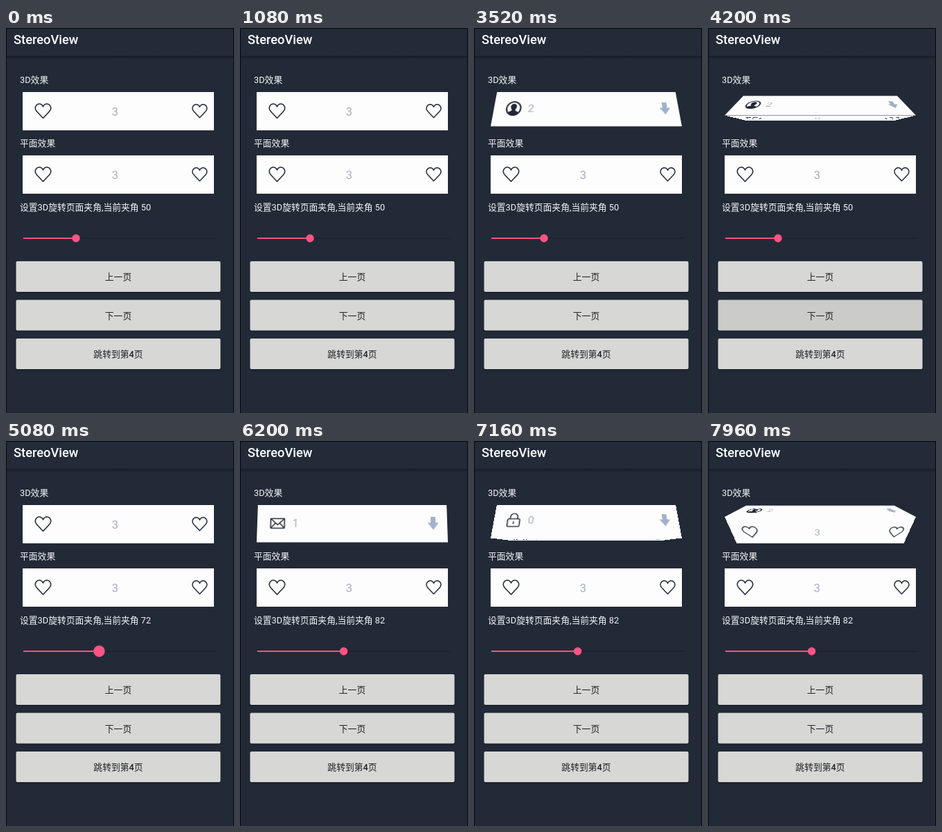
These frames come from a looping animation (329x553 px, 8 s). An HTML page:

```html
<!DOCTYPE html>
<html lang="zh">
<head>
<meta charset="utf-8">
<title>StereoView</title>
<style>
  html, body { margin: 0; width: 100%; height: 100%; overflow: hidden; background: #222a37; }
  #stage { position: absolute; left: 0; top: 0; width: 329px; height: 553px; overflow: hidden; }
  svg { position: absolute; left: 0; top: 0; display: block; }
  text { font-family: Roboto, "Noto Sans CJK SC", "Noto Sans CJK", sans-serif; }
  .title { font-size: 18.3px; font-weight: 500; fill: #fff; }
  .label { font-size: 12.8px; fill: #f4f5f7; }
  .button rect { fill: #d7d7d6; filter: drop-shadow(0 1px 1px rgba(0, 0, 0, .4)); }
  .button .press { fill: #000; opacity: 0; filter: none; }
  .button text { font-size: 12.8px; font-weight: 500; fill: #1f2126; text-anchor: middle; }
  .view { position: absolute; left: 24px; width: 276px; height: 55px; overflow: hidden; }
  .page { background: #fdfdfd; }
  .page text { font-size: 16.5px; fill: #a6aec1; text-anchor: middle; }
  .line { fill: none; stroke: #252c3b; stroke-width: 1.6; stroke-linejoin: round; stroke-linecap: round; }
  .solid { fill: #1f2839; }
  .arrow { fill: #a2b0cb; }
</style>
</head>
<body>
<div id="stage">
  <svg width="329" height="553">
    <defs>
      <linearGradient id="shade" x2="0" y2="1">
        <stop stop-color="#161c27"/>
        <stop offset="1" stop-color="#161c27" stop-opacity="0"/>
      </linearGradient>
    </defs>
    <rect width="329" height="41" fill="#232a38"/>
    <rect y="40" width="329" height="5" fill="url(#shade)"/>
    <text class="title" x="11" y="22.5">StereoView</text>
    <text class="label" x="20" y="78.7">3D效果</text>
    <text class="label" x="20" y="170">平面效果</text>
    <text class="label" x="20" y="261.5" id="angle"></text>
    <path d="M25 302H303" stroke="#1b222d" stroke-width="1.5"/>
    <path id="track" stroke="#fb5080" stroke-width="2"/>
    <circle id="thumb" cy="302" fill="#ff5482"/>
    <g id="buttons"></g>
    <path d="M.5 553V.5H328.5V553" fill="none" stroke="#05070a"/>
  </svg>
  <div class="view" id="stereo" style="top:92px"></div>
  <div class="view" id="flat" style="top:183px"></div>
</div>
<script>
const LOOP = 8000, STEP = 40, HEIGHT = 55, DEPTH = 175;
const $ = id => document.getElementById(id);
const clamp = x => Math.max(0, Math.min(1, x));
const mix = (a, b, k) => a + (b - a) * k;

// Icons are drawn around their own centre
const at = (x, y, body, scale = 1) =>
  `<g transform="translate(${x} ${y}) scale(${scale})">${body}</g>`;
const heart = '<path class="line" d="M0 10.5L-9 1C-14-4.5-9.500-10-5.500-10C-2.500-10-.8-8 0-6C.8-8 2.500-10 5.500-10C9.500-10 14-4.500 9 1Z"/>';
const lock = '<rect class="line" x="-9" y="-2" width="18" height="12" rx="1.500"/><path class="line" d="M-5.500-2V-5A5.500 5.500 0 0 1 5.500-5V-2M0 2.500V5.500"/>';
const mail = '<rect class="line" x="-10" y="-7" width="20" height="14" rx="1"/><path class="line" d="M-9.500-6.500L0 2L9.500-6.500M-9.500 6.500L-3-.5M9.500 6.500L3-.5"/>';
const person = '<circle class="line" r="10.500" style="stroke-width:2.200"/><path class="solid" d="M-8 7C-6.500 4-2.500 4.500-2.500 2C-6-2-4.500-7.500 0-7.500S6 -2 2.500 2C2.500 4.500 6.500 4 8 7C4 11.500-4 11.500-8 7Z"/>';
const arrow = '<path class="arrow" d="M-3.500-9.500H3.500V-1H8L0 9.500L-8-1H-3.500Z"/>';

const page = body => `<svg class="page" width="276" height="${HEIGHT}">${body}</svg>`;
const entry = (icon, n) =>
  page(at(29.5, 27.5, icon) + `<text x="55.500" y="33.500">${n}</text>` + at(255.5, 27.5, arrow));
const last = page(at(29.5, 27, heart) + '<text x="133.500" y="33.800">3</text>' + at(255.5, 27, heart, .93));

$('stereo').innerHTML = entry(lock, 0) + entry(mail, 1) + entry(person, 2) + last;
$('flat').innerHTML = last;
const pages = [...$('stereo').children];

$('buttons').innerHTML = ['上一页', '下一页', '跳转到第4页'].map((name, i) => {
  const y = 335 + i * 55.5;
  const box = `x="14.500" y="${y}" width="295" height="44" rx="2"`;
  return `<g class="button"><rect ${box}/><rect class="press" ${box}/><text x="162" y="${y + 27}">${name}</text></g>`;
}).join('');
const presses = [...document.querySelectorAll('.press')];
const pressTimes = [3160, 3960, 7480];

const linear = k => k;
const easeIn = k => k * k;
// Fast start with a long exponential tail
const fluid = k => {
  const x = k * 8;
  return x < 1 ? x - 1 + Math.exp(-x) : 1 - (1 - Math.exp(-1)) * Math.exp(1 - x);
};

// start, duration, from page, to page, easing
const moves = [
  [0, 1, 3, 3, linear],
  [3330, 540, 3, 2, fluid],
  [4130, 540, 2, 3, fluid],
  [5700, 120, 3, 2.75, linear],
  [5820, 640, 2.75, 1, fluid],
  [6540, 558, 1, .5, easeIn],
  [7098, 270, .5, 0, fluid],
  [7580, 1080, 0, 3, fluid]
];

function position(t) {
  const [start, span, from, to, ease] = moves.filter(m => m[0] <= t).pop();
  const p = mix(from, to, ease(clamp((t - start) / span)));
  return Math.abs(p - to) < .008 ? to : p;
}

function sliderValue(t) {
  return t < 5080 ? mix(50, 72, clamp((t - 4720) / 360)) : mix(72, 82, clamp((t - 5080) / 200));
}

function drawPages(p, fold) {
  const top = Math.floor(p), f = p - top;
  pages.forEach((el, i) => {
    const away = i === top ? f : 1 - f;
    const shown = (i === top || i === top + 1 && f > 0) && fold * away < 90;
    el.style.visibility = shown ? 'visible' : 'hidden';
    if (!shown) return;
    const sign = i === top ? 1 : -1;
    el.style.transformOrigin = sign > 0 ? '50% 100%' : '50% 0';
    el.style.transform = away
      ? `translateY(${-sign * away * HEIGHT}px) perspective(${DEPTH}px) rotateX(${sign * fold * away}deg)`
      : 'none';
  });
}

function draw(t) {
  const value = sliderValue(t), x = 25 + value * 1.52;
  const held = clamp((t - 4660) / 100) - clamp((t - 5300) / 100);
  $('angle').textContent = `设置3D旋转页面夹角,当前夹角 ${Math.round(value)}`;
  $('track').setAttribute('d', `M25 302H${x}`);
  $('thumb').setAttribute('cx', x);
  $('thumb').setAttribute('r', mix(5.7, 8.2, held));
  presses.forEach((el, i) => {
    const dt = t - pressTimes[i];
    el.style.opacity = .1 * (clamp((dt + 40) / 120) - clamp((dt - 160) / 180));
  });
  drawPages(position(t), 180 - value);
}

const origin = performance.now();
function tick() {
  const t = (performance.now() - origin) % LOOP;
  draw(Math.floor(t / STEP) * STEP);
  requestAnimationFrame(tick);
}
tick();
</script>
</body>
</html>
```
